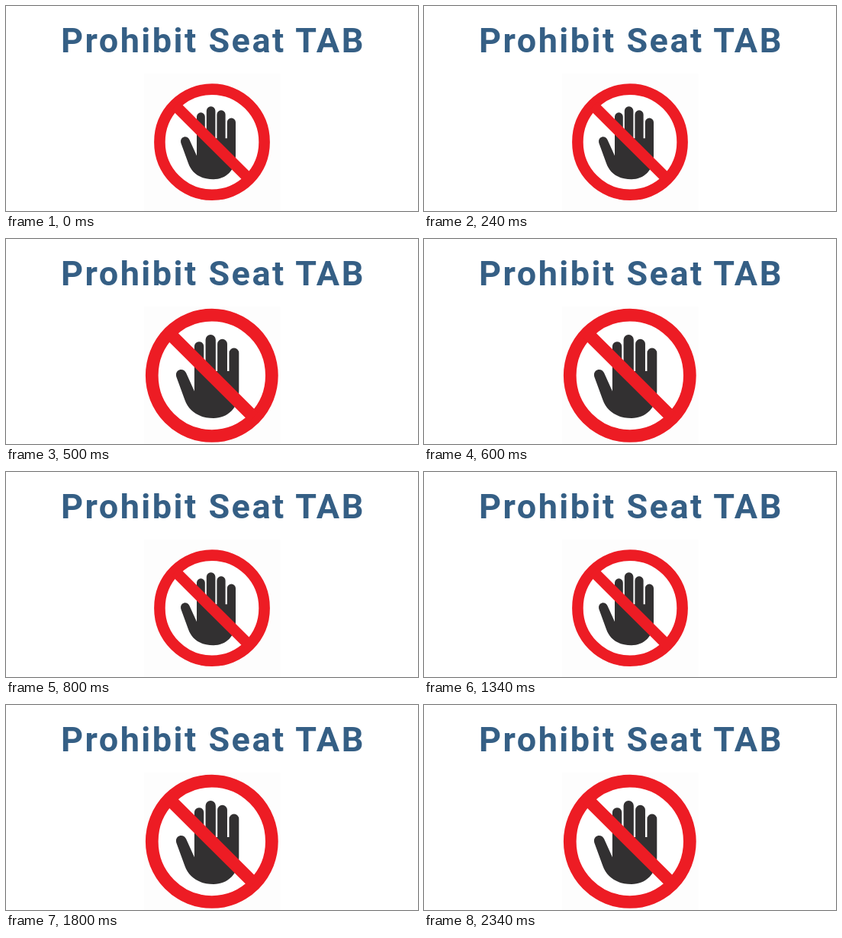
Animation, 540 px wide and 270 px high, one loop 2700 ms. Source, as an HTML page:

```html
<!DOCTYPE html>
<html lang="en">
<head>
<meta charset="utf-8">
<title>No entry sign</title>
<style>
  html, body { margin: 0; width: 100%; height: 100%; overflow: hidden; background: #fff; }
  svg { display: block; width: 100%; height: 100%; }
  text { font: 600 45px Roboto, sans-serif; letter-spacing: 2.5px; fill: #355f85; }
</style>
</head>
<body>
<svg viewBox="0 0 540 270">
  <text x="72" y="61">Prohibit Seat TAB</text>
  <rect x="181" y="89" width="179" height="181" fill="#fdfdfd"/>
  <g id="sign">
    <ellipse rx="69" ry="70" fill="#fff"/>
    <path id="hand" fill="#323031" d="
      M-20 18 V-33.5 a5.4 5.4 0 0 1 10.8 0 V-5 h2
      V-41.2 a5.8 5.8 0 0 1 11.6 0 V-5 h2
      V-36.3 a5.6 5.6 0 0 1 11.2 0 V-5 h2.2
      V-26 a5.6 5.6 0 0 1 11.2 0 V18
      C31 37 18 49 2 49 C-14 49 -26 42 -31 28
      L-40.6 1.5 C-43 -7 -32.5 -10 -29.5 -3 Z"/>
    <g fill="none" stroke="#ed1c24">
      <ellipse rx="68.6" ry="69.6" stroke-width="14.6"/>
      <path d="M-48 -48 L48 48" stroke-width="14.4"/>
    </g>
  </g>
</svg>
<script>
  const LOOP = 2700;
  const sign = document.getElementById("sign");

  const isLarge = t => (t >= 400 && t < 800) || t >= 1700;

  function draw(now) {
    const large = isLarge(now % LOOP);
    sign.setAttribute("transform", large
      ? "translate(269.8 179.8) scale(1.145)"
      : "translate(270 179.2)");
    requestAnimationFrame(draw);
  }
  draw(performance.now());
</script>
</body>
</html>
```
